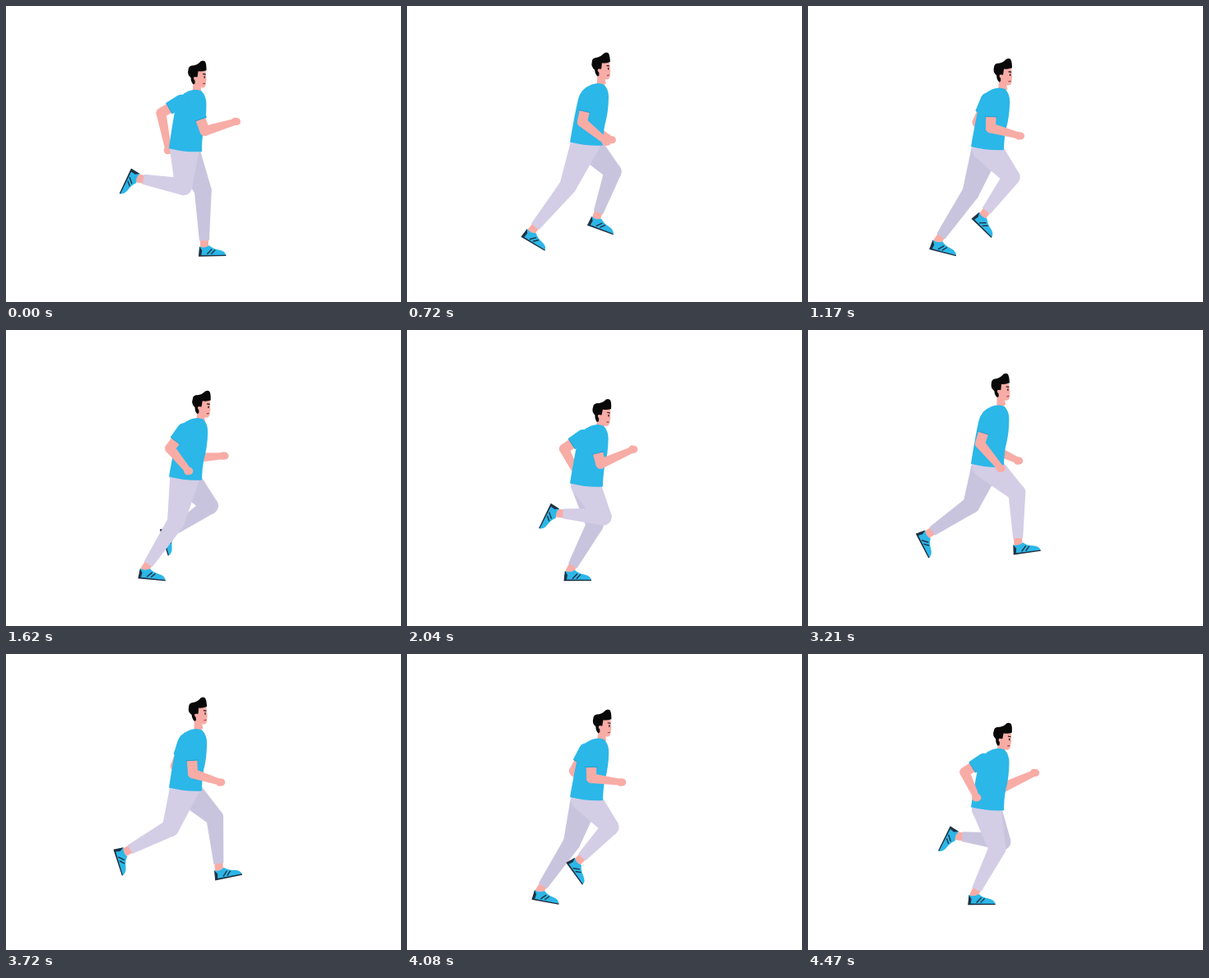
These frames come from a looping animation (480x360 px, 4.5 s). An HTML page with a canvas:

```html
<!DOCTYPE html>
<html lang="en">
<head>
<meta charset="utf-8">
<title>Running man</title>
<style>
  html, body { margin: 0; width: 100%; height: 100%; overflow: hidden; background: #fff; }
  canvas { display: block; }
</style>
</head>
<body>
<canvas id="stage" width="480" height="360"></canvas>
<script>
const ctx = document.getElementById('stage').getContext('2d');
const LOOP = 4500, STEP = 30, STRIDE = 975, HALF = STRIDE / 2;
const SHIRT = '#2bb7e8', HEM = '#239fd0', SKIN = '#f8aca6', DARK = '#233142', HAIR = '#090909';
const PANTS_NEAR = '#d4cde6', PANTS_FAR = '#c9c4de';

// One stride of a foot: time, ankle x, ankle y, foot angle.
const FOOT_PATH = [
  [0, 160, 209.5, 115],     // kicked up behind
  [86, 181.5, 222, 116],
  [195, 212.5, 255, 44],    // swinging through
  [307.5, 259, 262, -12],   // reaching forward
  [455, 249, 292, -2],      // landing
  [600, 188, 293, 0],       // end of support
  [682.5, 157.5, 286, 14],  // pushing off
  [795, 144.5, 241, 72]
];

// Periodic monotone spline through the foot path.
function footPose(time) {
  const n = FOOT_PATH.length, t = time % STRIDE;
  const at = (i, c) => FOOT_PATH[(i + n) % n][c] + (c ? 0 : STRIDE * Math.floor(i / n));
  const rate = (i, c) => (at(i + 1, c) - at(i, c)) / (at(i + 1, 0) - at(i, 0));
  const slope = (i, c) => {
    const a = rate(i - 1, c), b = rate(i, c);
    return a * b <= 0 ? 0 : 2 * a * b / (a + b);
  };
  let i = n - 1;
  while (at(i, 0) > t) i--;
  const span = at(i + 1, 0) - at(i, 0), s = (t - at(i, 0)) / span;
  return [1, 2, 3].map(c => {
    const p = at(i, c), q = at(i + 1, c);
    return p + (q - p) * s * s * (3 - 2 * s)
      + span * s * (1 - s) * (slope(i, c) * (1 - s) - slope(i + 1, c) * s);
  });
}

// Two-bone knee, bending forward; the leg lengthens as it straightens.
function kneeBetween(hx, hy, ax, ay) {
  const d = Math.hypot(ax - hx, ay - hy), ux = (ax - hx) / d, uy = (ay - hy) / d;
  const total = 100 + 31 * (d / 130) ** 4, thigh = total * 0.446, shin = total - thigh;
  const along = (thigh ** 2 - shin ** 2 + d * d) / (2 * d);
  const out = Math.sqrt(Math.max(0, thigh ** 2 - along ** 2));
  return [hx + ux * along + uy * out, hy + uy * along - ux * out];
}

function hipHeight(t) {
  const crouch = (1 + Math.cos(2 * Math.PI * (t - 92) / HALF)) / 2;
  return 166.5 + 24 * crouch ** 2.17;
}

function shape(color, d) {
  ctx.fillStyle = color;
  ctx.fill(new Path2D(d));
}

function strokes(color, width, d) {
  ctx.strokeStyle = color;
  ctx.lineWidth = width;
  ctx.stroke(new Path2D(d));
}

// Tapered limb part, round at the start and round or cut at the end.
function limb(color, ax, ay, ra, bx, by, rb, cut) {
  const dir = Math.atan2(by - ay, bx - ax), q = Math.PI / 2;
  ctx.fillStyle = color;
  ctx.beginPath();
  ctx.arc(ax, ay, ra, dir + q, dir - q);
  if (cut) {
    for (const side of [-q, q]) {
      ctx.lineTo(bx + rb * Math.cos(dir + side), by + rb * Math.sin(dir + side));
    }
  } else {
    ctx.arc(bx, by, rb, dir - q, dir + q);
  }
  ctx.fill();
}

function placed(x, y, degrees, draw) {
  ctx.save();
  ctx.translate(x, y);
  ctx.rotate(degrees * Math.PI / 180);
  draw();
  ctx.restore();
}

function shoe() {
  shape(SHIRT, 'M-6 0Q0 3 6-1Q10 3 17 4.5Q25 6 26 11.5H-7Z');
  shape(DARK, 'M-6 0L-3 5L-4 10.5L26 11V12.3H-7.5Z');
  strokes(DARK, 1.4, 'M3 9.5L9 3.5M8 9.5L13 4.5');
}

function leg(t, hip, color) {
  const [ax, ay, angle] = footPose(t);
  const hx = 217, hy = hip - 3;
  const [kx, ky] = kneeBetween(hx, hy, ax, ay);
  const cuff = 1 - 7 / Math.hypot(ax - kx, ay - ky);
  limb(SKIN, kx, ky, 5, ax, ay, 5);
  placed(ax, ay, angle, shoe);
  limb(color, hx, hy, 18, kx, ky, 10.5);
  limb(color, kx, ky, 10.5, kx + (ax - kx) * cuff, ky + (ay - ky) * cuff, 6, true);
}

function arm(t, hip) {
  const phase = 2 * Math.PI * t / STRIDE;
  const swing = (mid, a, b, lag = 0) => mid + a * Math.cos(phase) + b * Math.cos(2 * phase - lag);
  const ex = swing(215, 26.5, 2, -Math.PI / 2), ey = hip + swing(-31.5, 11, -6, 0.7);
  const fx = swing(242, 41, -3.5), fy = swing(161, -17.5, -3);
  const sx = 221 + (ex - 215) * 0.3, sy = hip - 61;
  const mx = sx + (ex - sx) * 0.6, my = sy + (ey - sy) * 0.6;
  const len = Math.hypot(ex - sx, ey - sy);
  const nx = -(ey - sy) / len * 7.5, ny = (ex - sx) / len * 7.5;
  limb(SKIN, sx, sy, 6.5, ex, ey, 6);
  limb(SKIN, ex, ey, 6, fx, fy, 3.8);
  limb(SKIN, fx - 1, fy, 4.8, fx + 1, fy, 4.5);
  limb(SHIRT, sx, sy, 8.5, mx, my, 7.8, true);
  strokes(HEM, 1, `M${mx - nx} ${my - ny}L${mx + nx} ${my + ny}`);
}

function head() {
  shape(SKIN, 'M-5-8L-6 4Q0 8 5 4L4-1Q9 0 10-4L10.5-8L11-11L10-22H-3Z');
  shape(HAIR, 'M-5-5Q-8-8-8-13Q-13-17-11-23Q-11-28-4-28Q0-29 2-31Q5-35 9-33Q11-31 11-22Q5-20 1-21L0-14L-3-12V-6Z');
  shape(SKIN, 'M-4-14a2 2.5 0 1 0 3 0z');
  strokes(HAIR, 1.2, 'M6.5-17.5L10-17M8.5-15V-12.5');
  strokes('#a83b46', 1.2, 'M6.5-5.5L9.5-6');
}

function torso(hip, lean) {
  ctx.save();
  ctx.transform(1, 0, -lean / 76, 1, 218, hip);
  shape(SHIRT, 'M5-74Q13-77 20-74Q26-68 26-58Q26-40 22-25Q20-14 20 0Q0 1-20-4C-17-24-14-42-11-56Q-8-69 5-74Z');
  ctx.restore();
}

function frame() {
  const now = performance.now() % LOOP;
  const t = Math.floor(now / STEP) * STEP;
  const hip = hipHeight(t), nod = (hip - 177) * 0.28;
  const sway = 0.5 + 2.8 * Math.cos(2 * Math.PI * (t - 180) / HALF);
  ctx.fillStyle = '#fff';
  ctx.fillRect(0, 0, 480, 360);
  arm(t + HALF, hip);
  leg(t + HALF, hip, PANTS_FAR);
  leg(t, hip, PANTS_NEAR);
  placed(234 + sway, hip - 77 + nod, nod, head);
  torso(hip, sway * 0.5);
  arm(t, hip);
  requestAnimationFrame(frame);
}
frame();
</script>
</body>
</html>
```
